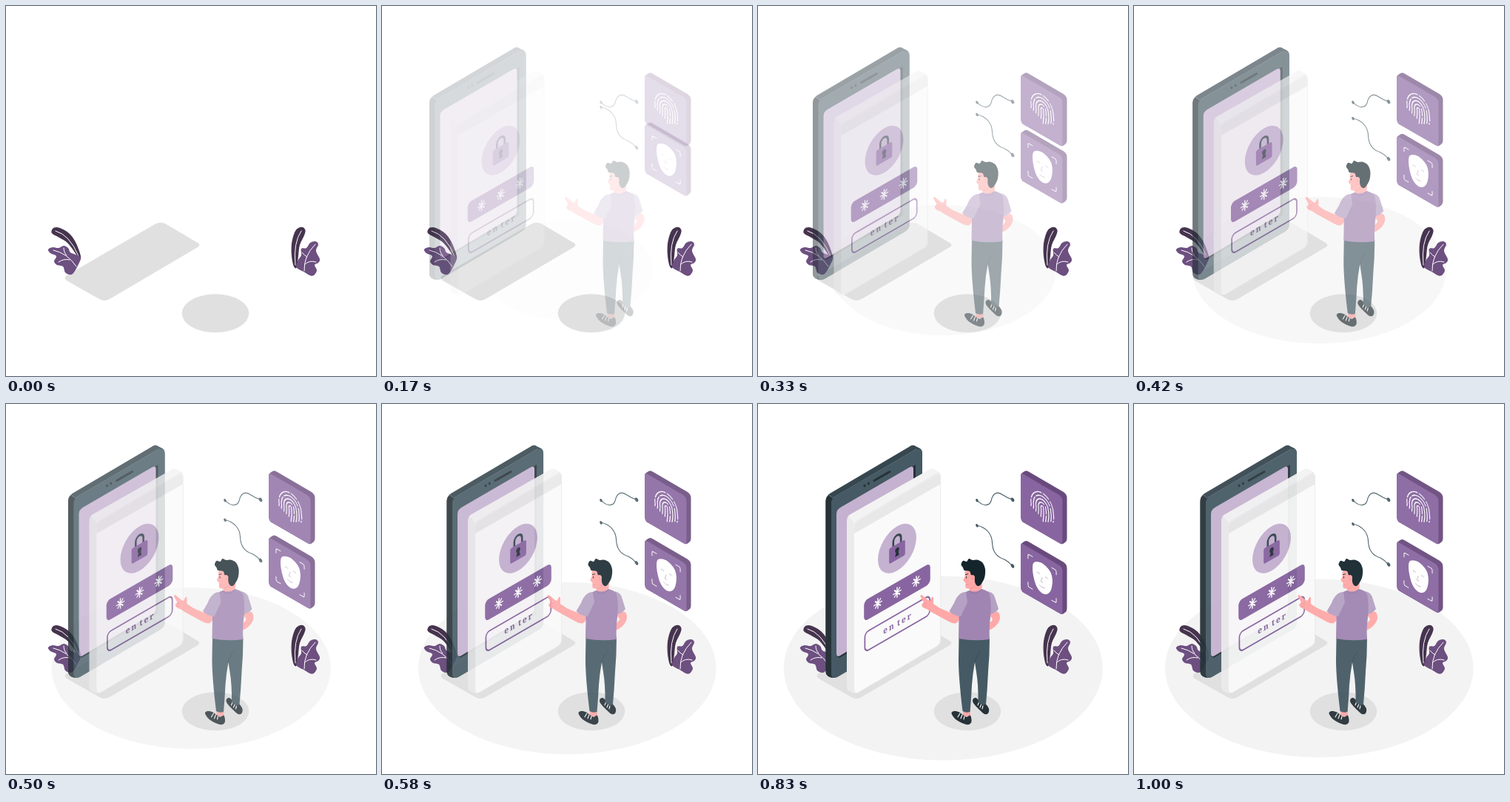
Animation, 500 px wide and 500 px high, one loop 1040 ms. Source, as an HTML page:

```html
<!DOCTYPE html>
<html lang="en">
<head>
<meta charset="utf-8">
<title>Phone login</title>
<style>
html, body { margin: 0; width: 100%; height: 100%; overflow: hidden; background: #fff; }
svg { display: block; width: 100vw; height: 100vh; }
.line { fill: none; stroke-linecap: round; stroke-linejoin: round; }
text { font: bold 11.5px "Noto Serif", "Liberation Serif", serif; letter-spacing: 2.4px; }
</style>
</head>
<body>
<svg id="stage" viewBox="0 0 500 500"></svg>
<script>
const C = {
  purple: '#8865a0', deep: '#694a7d', lilac: '#c5b2d1', leaf: '#6d4f80', night: '#46344f',
  slate: '#455a64', dark: '#37474f', ink: '#263238', hair: '#14252c', skin: '#ffa8a7',
  shirt: '#a085b2', sleeve: '#b5a1c4', shade: '#e0e0e0'
};

// Smooth closed outline through a few points
function blob(color, ...p) {
  const n = p.length / 2;
  const at = i => { const j = ((i + n) % n) * 2; return [p[j], p[j + 1]]; };
  let d = `M${at(0)}`;
  for (let i = 0; i < n; i++) {
    const [a, b, c, e] = [at(i - 1), at(i), at(i + 1), at(i + 2)];
    d += `C${b.map((v, k) => v + (c[k] - a[k]) / 6)} ${c.map((v, k) => v - (e[k] - b[k]) / 6)} ${c}`;
  }
  return shape(color, d);
}
function shape(color, d) { return `<path fill="${color}" d="${d}"/>`; }
function line(color, width, d, extra = '') {
  return `<path class="line" stroke="${color}" stroke-width="${width}" d="${d}" ${extra}/>`;
}
function oval(color, x, y, rx, ry = rx, turn = 0) {
  return `<ellipse fill="${color}" cx="${x}" cy="${y}" rx="${rx}" ry="${ry}" transform="rotate(${turn} ${x} ${y})"/>`;
}
// Isometric wall: side -1 rises to the right, +1 falls
function wall(side, x, y, body) {
  return `<g transform="matrix(.866 ${side / 2} 0 1 ${x} ${y})">${body}</g>`;
}
function group(id, body) { return `<g id="${id}">${body}</g>`; }

function shadows() {
  return shape(C.shade, 'M82 364L201 295Q208 291 215 294L259 320Q264 323 259 326L140 396Q133 400 126 396L82 371Q77 367 82 364Z')
    + oval(C.shade, 283, 415.3, 45.3, 26);
}

function leaves() {
  return blob(C.night, 61.5, 304, 65, 299.5, 73, 300, 85, 307, 94, 319, 101, 338, 99, 343, 93, 333, 83, 320, 72, 313, 63, 308)
    + line('#fff', 1, 'M67 304Q86 309 98 338')
    + blob(C.leaf, 57, 329, 63, 326, 71, 327, 78, 324, 84, 327, 87, 333, 94, 336, 101, 340, 97, 351, 91, 361, 86, 363, 80, 360, 77, 352, 69, 350, 65, 345, 68, 338, 60, 334)
    + line('#fff', 1, 'M64 330Q83 334 95 352M78 327Q78 333 82 337M71 346Q78 341 86 343')
    + blob(C.night, 390, 306, 395, 300, 401, 299, 404.5, 303, 403, 310, 397, 323, 395, 338, 393, 353, 389, 352, 386, 338, 386, 321)
    + line('#fff', 1, 'M399 304Q388 320 391 350')
    + blob(C.leaf, 392.5, 353, 395, 343, 399, 337, 399, 328, 406, 327, 411, 320, 418, 318, 422, 322, 419, 331, 424, 342, 422, 347, 417, 350, 420, 357, 417, 363, 412, 364.5, 402, 359)
    + line('#fff', 1, 'M418 322Q402 338 403 358M400 333Q404 338 407 339M419 346Q410 343 404 349');
}

function phone() {
  return shape(C.dark, 'M91.5 131Q91.5 125 97 121L204 58Q209 54 213 57L219 60Q222 62 222 67V296Q222 301 216 305L107 369Q102 371 97 369Q91.5 367 91.5 361Z')
    + shape(C.ink, 'M91.5 131Q92 126 95 124L101 127Q99 130 99 134V364Q99 368 101 370L97 369Q91.5 367 91.5 361Z')
    + shape(C.slate, 'M99 134Q99 129 104 126L213 62Q222 58 222 67V296Q222 301 216 305L107 369Q99 372 99 364Z')
    + line('#6d7f88', .7, 'M96 123L101 127L214 61')
    + shape(C.ink, 'M108 142L213 82V283L110 343L106 341Z')
    + shape(C.lilac, 'M106 149Q106 143 111 140L204 86Q210 82 210 88V276Q210 281 205 284L111 340Q106 343 106 337Z')
    + oval(C.ink, 144, 110.3, 1.5, 1.9) + oval(C.ink, 149.3, 107.3, 1.5, 1.9)
    + line(C.ink, 3, 'M157 103.5L178 91.5');
}

function star(x) {
  return `<g transform="translate(${x} 0)">${line('#fff', 1.7, 'M0-6.5V6.5M-6 0H6M-4-4.5L4 4.5M-4 4.5L4-4.5')}</g>`;
}

function panel() {
  const lock = `<circle r="30" fill="${C.lilac}"/>`
    + line(C.dark, 3, 'M-6-6V-12A6 6 0 0 1 6-12V-6')
    + `<rect x="-12.5" y="-6" width="25" height="21" rx="2.5" fill="${C.purple}"/>`
    + `<circle cy="2" r="3.2" fill="${C.ink}"/>` + shape(C.ink, 'M-1 2H1L3.2 10H-3.2Z');
  const code = `<rect x="-51.7" y="-14" width="103.4" height="28" rx="6" fill="${C.purple}"/>` + star(-30) + star(0) + star(30);
  const enter = `<rect x="-50.7" y="-13" width="101.4" height="26" rx="6" fill="none" stroke="${C.purple}" stroke-width="2"/>`
    + `<text x="-22" y="3.5" fill="${C.purple}">en<tspan dx="2.5">ter</tspan></text>`;
  return shape('#ebebeb', 'M120 158Q120 152 125 149L231 89Q235 86 239 89L244 92Q247 94 247 99V318Q247 324 241 328L137 389Q132 392 127 390L123 388Q120 386 120 381Z')
    + shape('#f3f3f3', 'M122 151L231 89Q235 86 239 89L244 92L134 157L130 161Z')
    + shape('#fafafa', 'M130 167Q130 161 135 158L240 96Q247 92 247 99V318Q247 324 241 328L137 389Q130 393 130 385Z')
    + shape('#e8e8e8', 'M130 167Q130 161 135 158L240 96Q247 92 247 99V108L130 175Z')
    + line('#e6e6e6', .7, 'M246.6 108V318Q246.6 324 241 327.6L137 389')
    + wall(-1, 188, 195.3, lock) + wall(-1, 188, 254.5, code) + wall(-1, 188.3, 296.8, enter);
}

function shoes() {
  return shape(C.skin, 'M277 412H287L287 424L277 421ZM298 400L308 403L309 412L299 409Z')
    + blob(C.ink, 261.5, 418, 265, 415, 271, 416, 277, 420, 282, 423, 287, 421, 288.5, 429, 285, 433, 278, 432, 267, 426)
    + blob(C.ink, 290.5, 399, 294, 397, 299, 401, 303, 406, 308, 406, 312, 412, 311, 418, 306, 419, 299, 413, 291, 404)
    + line('#fff', 1.1, 'M270 423L273 418M274 425L276 420M278 426L279 422M297 407L299 402M300 410L302 405M303 412L304 408');
}

function man() {
  return shoes()
    + shape(C.slate, 'M271.5 315L313 316Q313 340 311 362Q310 385 308 406Q303 408 297.5 403Q298 380 295 362L293 349Q290 365 289 380Q288 400 286.5 416Q281 418 276.5 415Q271 370 271 345Z')
    + line('#37494f', .7, 'M293 349Q295 340 300 335')
    // far arm
    + blob(C.skin, 313, 284, 324, 281, 327, 289, 323, 298, 314, 305, 310, 303, 313, 296, 317, 291)
    + shape(C.sleeve, 'M308 253Q317 253 320 261L325 277Q321 283 311 285Z')
    // pointing arm
    + shape(C.skin, 'M260 280L274 286Q272 294 267 296.5Q263 297 256 293L234 281L228 277Q222 276 221 271L224 268L219.5 260Q219 257 222 258.5L230 265L232.5 266L235 261Q237.5 260 237 264L237 270L246 276L260 282Z')
    + line('#ec8d92', .7, 'M224 269L228 270M223 273L227 273.5')
    // neck and face
    + shape(C.skin, 'M286 242H303L302 253Q294 259 286 254Z')
    + blob(C.skin, 281, 225, 293, 224, 301, 232, 298, 245, 288, 249, 281, 248.5, 280.5, 242, 277.5, 238, 279.5, 233)
    + line(C.hair, 1, 'M280.5 230.5L283.5 229.8M281.5 233.5V235')
    + line('#ec8d92', .7, 'M281 244H284M286 250Q291 249 294 245')
    + shape(C.shirt, 'M286 252Q294 256 302 250Q311 252 313 257Q316 270 314 288Q312 304 313 318Q292 321 271 317L271.5 291Q271 275 274 261Q278 254 286 252Z')
    + shape(C.sleeve, 'M274 256Q268 260 265 269L258.5 280Q264 286 274 287L283 268L281 254Q277 254 274 256Z')
    + line('#8d719f', .8, 'M285 253Q294 260 303 251')
    + blob(C.hair, 274.5, 217, 277, 212, 282, 213, 285, 209, 290, 211, 296, 210.5, 303, 214, 307, 223, 306, 235, 301, 244, 297, 246, 293.5, 242, 292, 232, 288, 231, 286, 226, 279, 225, 277, 221)
    + oval(C.skin, 290, 235.5, 2.8, 4.2, 12)
    + line('#ec8d92', .7, 'M289.5 234Q291 235 290 238');
}

function tile(icon) {
  return shape(C.deep, 'M355 97Q355 94 357 93L360 91Q362 89.5 365 91L413 119Q417.5 122 417.5 127V182Q417.5 185 415 187L412 189Q410 190 408 188L357 159Z')
    + shape(C.purple, 'M355 97Q355 93 359 95L407 123Q411.5 126 411.5 131V186Q411.5 191 407 188L359 160Q355 158 355 153Z')
    + wall(1, 384, 141, icon);
}

function print() {
  const dashes = ['', '24 3 9 3', '', '17 3 25 3', '9 3 22 3'];
  let out = '';
  for (let i = 0; i < 5; i++) {
    const r = 2 + i * 3.9, low = 15 - i * 1.7;
    out += line('#fff', 1.3, `M${-r} ${low - 3}Q${-r + 1} 3 ${-r} -1A${r} ${r * 1.12} 0 0 1 ${r} -1Q${r + 1.2} 7 ${r - .6} ${low + 2}`,
      dashes[i] && `stroke-dasharray="${dashes[i]}"`);
  }
  return out;
}

function face() {
  const corners = [[-1, -1], [1, -1], [-1, 1], [1, 1]].map(([x, y]) =>
    line('#fff', 1.1, `M${x * 22} ${y * 16}V${y * 20}Q${x * 22} ${y * 22} ${x * 20} ${y * 22}H${x * 15}`)).join('');
  return corners
    + blob('#fff', -15, -7, -12, -16, 0, -20.5, 12, -16, 16, -6, 14, 8, 8, 17, 0, 20, -8, 16, -13, 6)
    + line('#c9b8d3', 1, 'M-8-4Q-6-6-4-4M5-4Q7-6 9-4M0-1L-2 5H1M-4 11Q0 13 4 11');
}

function wire(d, y1, y2) {
  return line(C.slate, 1.1, d) + oval(C.slate, 296, y1, 1.6, 2.4, -30) + oval(C.slate, 344, y2, 2, 3, -30);
}

const stage = document.getElementById('stage');
stage.innerHTML = group('floor', '<ellipse cx="250.3" cy="357" rx="215.5" ry="124.6" fill="#f3f3f3"/>')
  + shadows() + leaves()
  + group('phone', phone()) + group('panel', panel())
  + group('top', tile(print()) + wire('M296 130C303 138 312 139 315 131C317 121 323 117 331 123Q337 127 344 129.3', 130.3, 129.3))
  + group('low', `<g transform="translate(0 94.7)">${tile(face())}</g>`
    + wire('M296 164C309 167 316 176 316.5 187C317 203 326 208 333 210Q339 213 344 219', 164.3, 218.8))
  + group('man', man());

const part = {};
for (const id of ['floor', 'phone', 'panel', 'top', 'low', 'man']) part[id] = document.getElementById(id);

const LOOP = 1040, STEP = 1000 / 24, SLIDE = 35;
const keys = [-.357, -.0714, .214, .5, .786, .957, 1, .943, .79];

// Progress curve, one key every four steps
function progress(k) {
  const i = Math.min(5, Math.floor(k / 4)), u = k / 4 - i;
  const [a, b, c, d] = keys.slice(i, i + 4);
  const v = b + u / 2 * (c - a + u * (2 * a - 5 * b + 4 * c - d + u * (3 * (b - c) + d - a)));
  return Math.max(0, Math.min(1, v));
}

function draw(ms) {
  const p = progress(Math.min(24, Math.floor((ms % LOOP + 5) / STEP)));
  const off = SLIDE * (p - 1);
  const move = (id, x, y) => part[id].setAttribute('transform', `translate(${x} ${y})`);
  for (const id in part) part[id].setAttribute('opacity', p < .01 ? 0 : p);
  move('phone', off, 0);
  move('panel', off, 0);
  move('man', -off, 0);
  move('low', 0, off);
  const s = 1 + off / 60;
  part.floor.setAttribute('transform', `translate(250.3 357) scale(${s}) translate(-250.3 -357)`);
}

let start;
function tick(now) {
  start ??= now;
  draw(now - start);
  requestAnimationFrame(tick);
}
draw(0);
requestAnimationFrame(tick);
</script>
</body>
</html>
```
